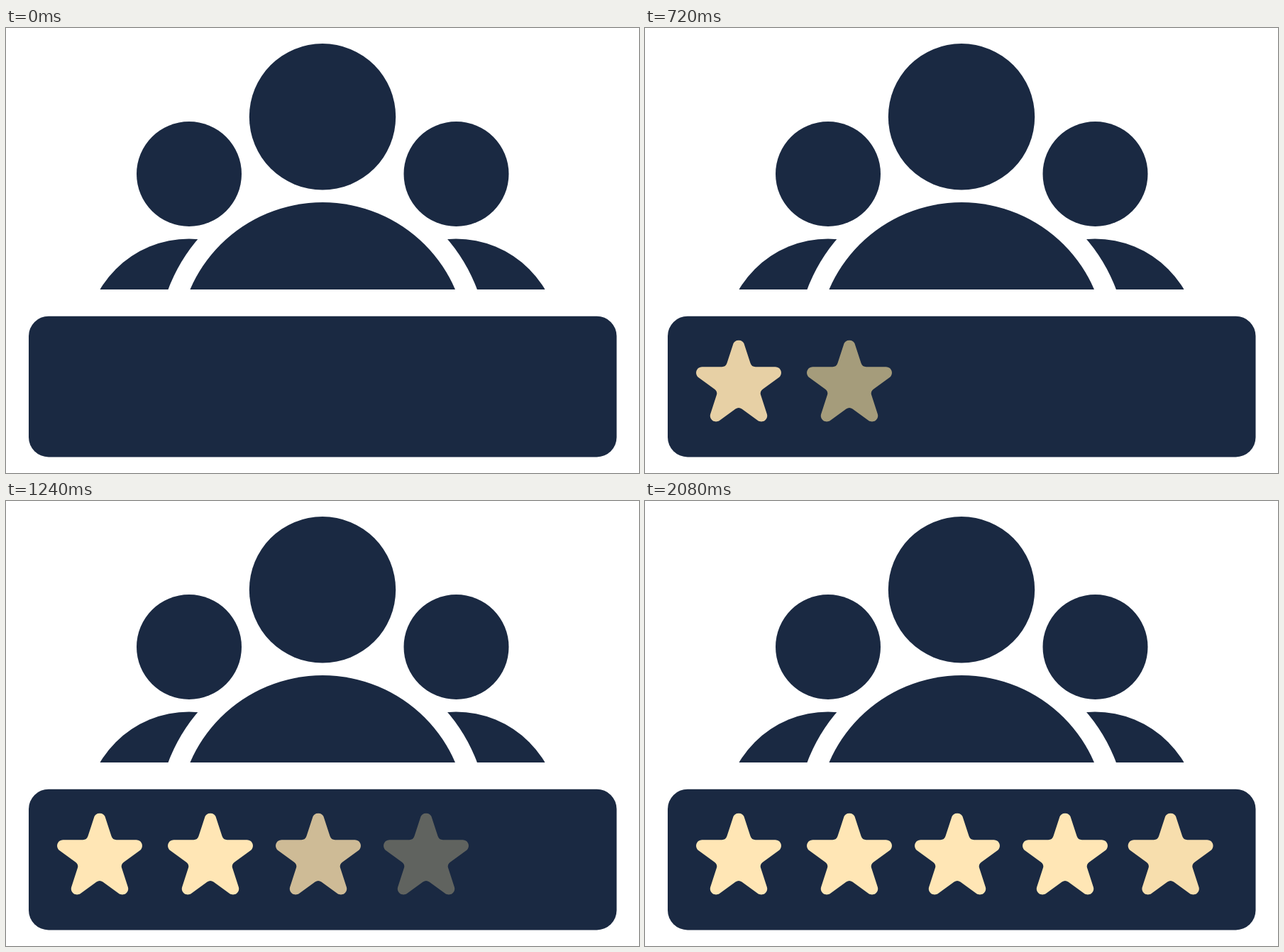
Recreate the animation shown at these times as an HTML page with a canvas. Size 892 by 628 pixels, loop 4.96 s.

```html
<!DOCTYPE html>
<html lang="en">
<head>
<meta charset="utf-8">
<title>Five star rating</title>
<style>
  html, body { margin: 0; width: 100%; height: 100%; overflow: hidden; background: #fff; }
  canvas { display: block; width: 892px; height: 628px; }
</style>
</head>
<body>
<canvas id="stage" width="892" height="628"></canvas>
<script>
const ctx = document.getElementById('stage').getContext('2d');
const NAVY = '#1a2942';
const LOOP = 4960, LAST_CHANGE = 2080, STEP = 40;

// Each star: centre x and the time its fade begins.
const STARS = [
  { x: 132, start: 200 },
  { x: 288, start: 480 },
  { x: 440, start: 840 },
  { x: 592, start: 1120 },
  { x: 740.6, start: 1480 }
];

// Fade-in: ms after the start, then the colour reached.
const FADE = [
  [0, [26, 41, 66]],
  [240, [165, 156, 123]],
  [280, [173, 165, 132]],
  [320, [189, 173, 140]],
  [520, [231, 208, 165]],
  [600, [247, 222, 173]],
  [640, [255, 230, 181]]
];

function fadeColor(age) {
  const i = FADE.findIndex(([time]) => time > age);
  if (i < 0) return `rgb(${FADE[FADE.length - 1][1]})`;
  const [t0, from] = FADE[i - 1], [t1, to] = FADE[i];
  const p = (age - t0) / (t1 - t0);
  return `rgb(${from.map((c, k) => Math.round(c + (to[k] - c) * p))})`;
}

function disc(x, y, r, color = NAVY) {
  ctx.fillStyle = color;
  ctx.beginPath();
  ctx.arc(x, y, r, 0, Math.PI * 2);
  ctx.fill();
}

function starPath() {
  const path = new Path2D();
  const point = i => {
    const r = i % 2 ? 31 : 81.16;
    const a = i * Math.PI / 5 - Math.PI / 2;
    return [r * Math.cos(a), r * Math.sin(a)];
  };
  const [ax, ay] = point(0), [bx, by] = point(1);
  path.moveTo((ax + bx) / 2, (ay + by) / 2);
  for (let i = 1; i <= 10; i++) {
    path.arcTo(...point(i), ...point(i + 1), i % 2 ? 7.5 : 8.3);
  }
  path.closePath();
  return path;
}

const star = starPath();

function drawPeople() {
  disc(446, 125.3, 103.2);
  disc(258, 206, 74);
  disc(634.5, 206, 74);

  ctx.save();
  ctx.beginPath();
  ctx.rect(0, 240, 892, 129);
  ctx.clip();
  disc(258, 443.4, 145.9);
  disc(634, 443.4, 145.9);
  disc(446.2, 449.3, 232, '#fff');
  disc(446.2, 449.3, 203.3);
  ctx.restore();
}

function drawPanel() {
  ctx.fillStyle = NAVY;
  ctx.beginPath();
  ctx.roundRect(32, 406.7, 828.5, 198.8, 28);
  ctx.fill();
}

function draw(time) {
  ctx.fillStyle = '#fff';
  ctx.fillRect(0, 0, 892, 628);
  drawPeople();
  drawPanel();
  for (const { x, start } of STARS) {
    if (time <= start) continue;
    ctx.save();
    ctx.translate(x, 503.3);
    ctx.fillStyle = fadeColor(time - start);
    ctx.fill(star);
    ctx.restore();
  }
}

const begin = performance.now();

function tick() {
  const t = (performance.now() - begin) % LOOP;
  draw(Math.min(Math.floor(t / STEP) * STEP, LAST_CHANGE));
  requestAnimationFrame(tick);
}

tick();
</script>
</body>
</html>
```
